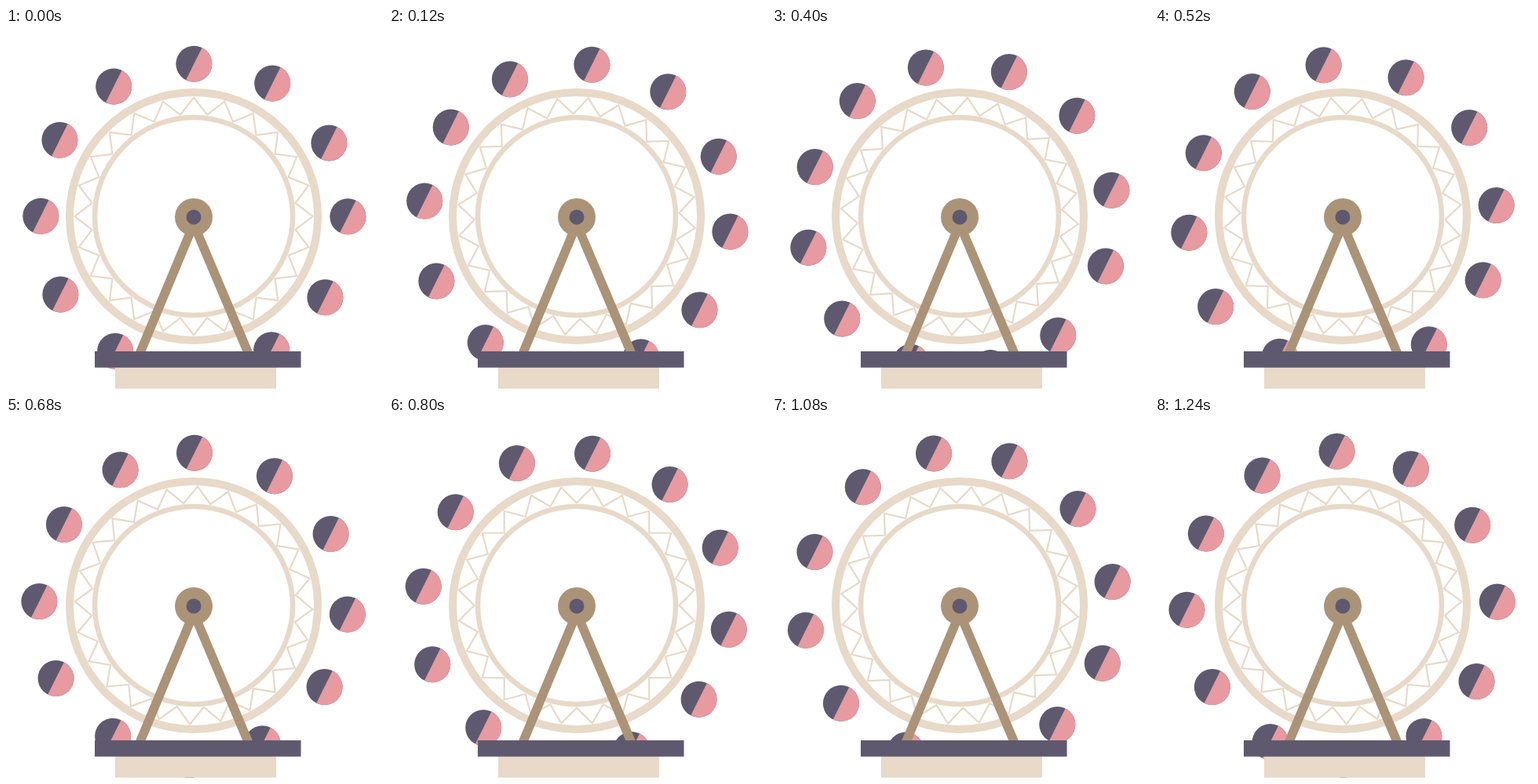
An HTML page with a canvas that plays this animation: 480x460 px, repeating every 1.28 s.

```html
<!DOCTYPE html>
<html lang="en">
<head>
<meta charset="utf-8">
<title>Ferris wheel</title>
<style>
  html, body { margin: 0; width: 100%; height: 100%; overflow: hidden; background: #fff; }
  canvas { display: block; }
</style>
</head>
<body>
<canvas id="stage" width="480" height="460"></canvas>
<script>
const ctx = document.getElementById('stage').getContext('2d');

const LOOP = 1280, STEP = 40, TURN = 60;
const CX = 239, CY = 240;
const CREAM = '#e8d9c8', BROWN = '#ab9378', DARK = '#5f596f', PINK = '#e79a9f';
const TEETH = 24;

// Hand-placed cabins: [degrees clockwise from the top, distance from the axle]
const CABINS = [
  [0.1, 194.3], [30.6, 196.8], [61.5, 196.1], [90.1, 196.3],
  [121.7, 196.7], [149.8, 197], [179.8, 196], [210.2, 198.6],
  [239.6, 196.7], [270.1, 194.7], [299.7, 196.4], [328.4, 194.3]
];
const CABIN_RADIUS = 23;
const CABIN_TILT = 26.5;

const rad = deg => deg * Math.PI / 180;
const polar = (deg, r) => [CX + r * Math.sin(rad(deg)), CY - r * Math.cos(rad(deg))];

function disc(x, y, r, color) {
  ctx.fillStyle = color;
  ctx.beginPath();
  ctx.arc(x, y, r, 0, 2 * Math.PI);
  ctx.fill();
}

function ring(r, width) {
  ctx.strokeStyle = CREAM;
  ctx.lineWidth = width;
  ctx.beginPath();
  ctx.arc(CX, CY, r, 0, 2 * Math.PI);
  ctx.stroke();
}

function bar(x, y, w, h, color) {
  ctx.fillStyle = color;
  ctx.fillRect(x, y, w, h);
}

function cabin(x, y) {
  disc(x, y, CABIN_RADIUS, DARK);
  const start = rad(CABIN_TILT - 90);
  ctx.fillStyle = PINK;
  ctx.beginPath();
  ctx.arc(x, y, CABIN_RADIUS, start, start + Math.PI);
  ctx.fill();
}

function truss(turn) {
  ctx.strokeStyle = CREAM;
  ctx.lineWidth = 2.2;
  ctx.lineJoin = 'miter';
  ctx.beginPath();
  for (let i = 0; i < TEETH * 2; i++) {
    ctx.lineTo(...polar(turn + i * 180 / TEETH, i % 2 ? 130.5 : 151.5));
  }
  ctx.closePath();
  ctx.stroke();
}

function leg(side) {
  ctx.strokeStyle = BROWN;
  ctx.lineWidth = 11.6;
  ctx.beginPath();
  ctx.moveTo(CX + side * 0.5, 251);
  ctx.lineTo(CX + 0.5 + side * 72.2, 422);
  ctx.stroke();
}

function draw(turn) {
  bar(0, 0, 480, 460, '#fff');
  for (const [angle, r] of CABINS) cabin(...polar(angle + turn, r));
  truss(turn);
  ring(158, 10);
  ring(126, 6.5);
  leg(-1);
  leg(1);
  disc(CX, 241, 24, BROWN);
  disc(CX, 241, 9.5, DARK);
  bar(139, 432, 205, 27.5, CREAM);
  bar(113, 412, 262.5, 20.7, DARK);
}

const began = performance.now();
function tick() {
  const time = (performance.now() - began) % LOOP;
  draw(Math.floor(time / STEP) * STEP / LOOP * TURN);
  requestAnimationFrame(tick);
}
tick();
</script>
</body>
</html>
```
